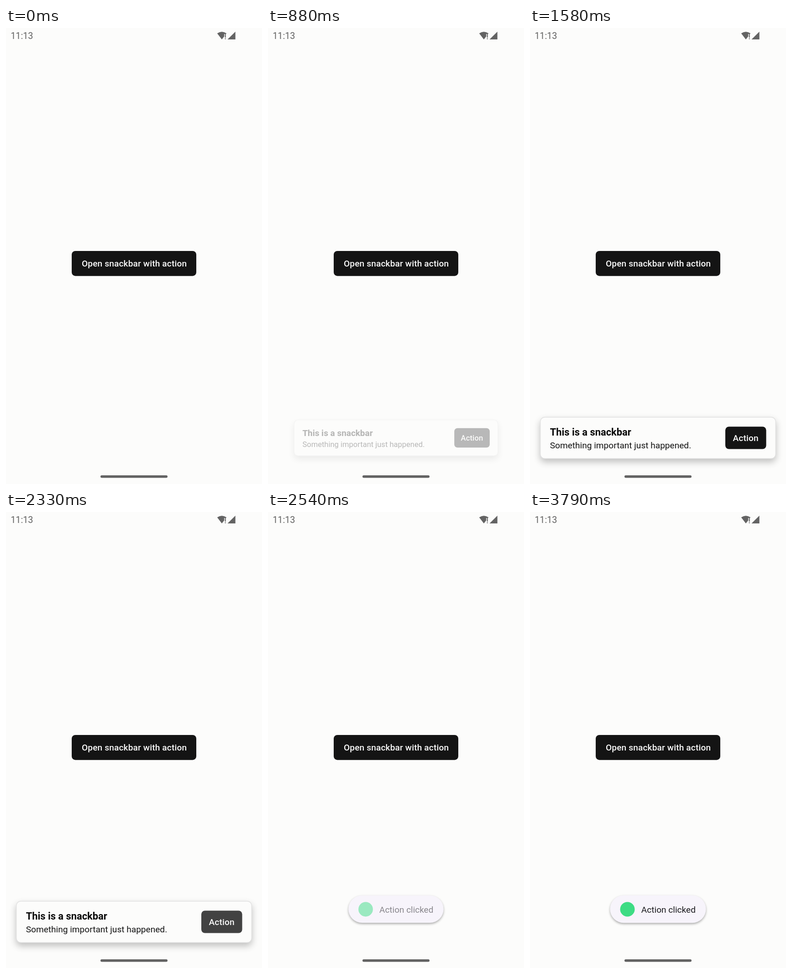
Recreate the animation shown at these times as an HTML page with a canvas. Size 561x998 px, loop 3.83 s.

```html
<!DOCTYPE html>
<html lang="en">
<head>
<meta charset="utf-8">
<title>Snackbar with action</title>
<style>
  html, body { margin: 0; width: 100%; height: 100%; overflow: hidden; background: #fcfcfb; }
  canvas { display: block; }
</style>
</head>
<body>
<canvas id="stage" width="561" height="998"></canvas>
<script>
const W = 561, H = 998, LOOP = 3830;
const DP = W / 411;
const BG = '#fcfcfb', INK = '#141414', STATUS = '#636363';

// Moments of the interaction, in ms
const OPEN_PRESS = 785, SNACK_IN = 838;
const ACTION_PRESS = 2285, TOAST_IN = 2350, SNACK_OUT = 2355;

const screen = document.getElementById('stage').getContext('2d');
const group = document.createElement('canvas');
group.width = W;
group.height = H;
const layer = group.getContext('2d');

const clamp = v => Math.min(1, Math.max(0, v));
const ramp = (t, start, length) => clamp((t - start) / length);
const lerp = (a, b, k) => a + (b - a) * k;

function bezier(x1, y1, x2, y2) {
  const axis = (a, b, s) => 3 * a * s * (1 - s) ** 2 + 3 * b * s * s * (1 - s) + s ** 3;
  return x => {
    let lo = 0, hi = 1;
    for (let i = 0; i < 24; i++) {
      const mid = (lo + hi) / 2;
      if (axis(x1, x2, mid) < x) lo = mid; else hi = mid;
    }
    return axis(y1, y2, (lo + hi) / 2);
  };
}
const standard = bezier(0.4, 0, 0.2, 1);
const decelerate = bezier(0, 0, 0, 1);

function box(c, x, y, w, h, r, fill) {
  c.beginPath();
  c.roundRect(x, y, w, h, r);
  c.fillStyle = fill;
  c.fill();
}

function polygon(c, points) {
  c.beginPath();
  points.forEach(([x, y]) => c.lineTo(x, y));
  c.fill();
}

function label(c, text, x, y, dp, weight, fill, spacing = 0) {
  c.font = `${weight} ${dp * DP}px Roboto, sans-serif`;
  c.letterSpacing = `${spacing * DP}px`;
  c.fillStyle = fill;
  c.fillText(text, x, y);
}

function shadow(c, color, blur, dy) {
  c.shadowColor = color;
  c.shadowBlur = blur;
  c.shadowOffsetY = dy;
}

const noShadow = c => shadow(c, 'transparent', 0, 0);

// Draws a part as one flattened group, scaled around its centre
function showGroup(draw, alpha, scale, cx, cy) {
  if (alpha <= 0) return;
  layer.setTransform(1, 0, 0, 1, 0, 0);
  layer.clearRect(0, 0, W, H);
  layer.setTransform(scale, 0, 0, scale, cx * (1 - scale), cy * (1 - scale));
  draw(layer);
  screen.globalAlpha = alpha;
  screen.drawImage(group, 0, 0);
  screen.globalAlpha = 1;
}

function buttonFill(press) {
  const v = Math.round(lerp(20, 66, press));
  return `rgb(${v},${v},${v})`;
}

function systemBars(c) {
  label(c, '11:13', 10.2, 24, 14.5, 400, STATUS);
  c.fillStyle = STATUS;
  c.beginPath();
  c.moveTo(462.8, 11.8);
  c.quadraticCurveTo(473, 4.8, 483.2, 11.8);
  c.lineTo(482.3, 13);
  c.lineTo(478.2, 13);
  c.lineTo(478.2, 18.6);
  c.lineTo(473, 25);
  c.fill();
  c.fillRect(479.7, 13, 2, 8);
  c.fillRect(479.7, 22.5, 2, 2);
  polygon(c, [[485.5, 25], [502.7, 25], [502.7, 8]]);
  box(c, 207, 979, 147, 5.5, 2.75, STATUS);
}

function openButton(c, press) {
  box(c, 144, 488, 273, 54.7, 8, buttonFill(press));
  label(c, 'Open snackbar with action', 166, 522, 14, 500, '#fafafa', 0.1);
}

function snackbar(c, press) {
  shadow(c, 'rgba(0,0,0,0.24)', 15, 7);
  box(c, 22, 851, 517, 92, 10.5, '#e1e1e1');
  noShadow(c);
  box(c, 23.4, 852.4, 514.2, 89.2, 9.2, BG);
  label(c, 'This is a snackbar', 43.7, 892, 16, 700, '#080808');
  label(c, 'Something important just happened.', 43.7, 920, 14, 400, '#141414');
  box(c, 428, 872.4, 89.6, 49.2, 8, buttonFill(press));
  label(c, 'Action', 444.5, 903.8, 14, 500, '#fafafa', 0.1);
}

function toast(c, content) {
  shadow(c, 'rgba(0,0,0,0.32)', 5, 2.5);
  box(c, 175.5, 839, 210, 60.3, 30.15, '#f7f4fb');
  noShadow(c);
  c.globalAlpha = content;
  box(c, 197.5, 853.5, 32, 32, 16, '#3ddc84');
  label(c, 'Action clicked', 243.8, 877.3, 14, 400, '#1b1b1f');
  c.globalAlpha = 1;
}

function draw(t) {
  screen.fillStyle = BG;
  screen.fillRect(0, 0, W, H);
  systemBars(screen);

  openButton(screen, ramp(t, OPEN_PRESS, 35) - ramp(t, SNACK_IN, 35));

  const enter = ramp(t, SNACK_IN, 150);
  const leave = ramp(t, SNACK_OUT, 75);
  const shown = standard(enter) - standard(leave);
  showGroup(c => snackbar(c, ramp(t, ACTION_PRESS, 40)),
    enter - leave, lerp(0.8, 1, shown), 280.5, 897);

  const grow = decelerate(ramp(t, TOAST_IN, 333));
  showGroup(c => toast(c, ramp(t, TOAST_IN + 50, 283)),
    ramp(t, TOAST_IN, 66), lerp(0.9, 1, grow), 280.5, 869.2);
}

const begin = performance.now();
function tick() {
  draw((performance.now() - begin) % LOOP);
  requestAnimationFrame(tick);
}
tick();
</script>
</body>
</html>
```
